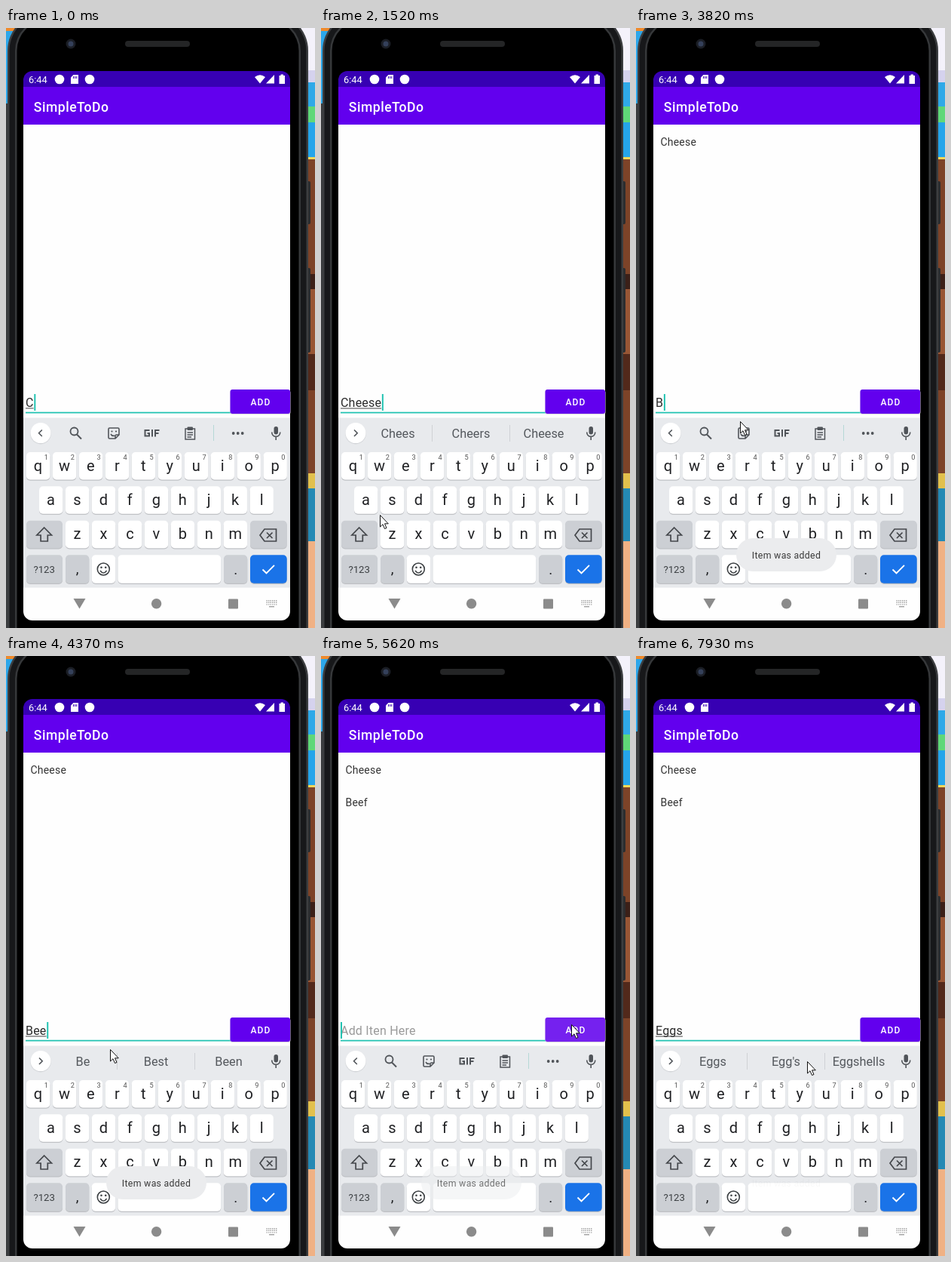
An HTML page with a canvas for the animation above (8 s loop, 410 by 795 pixels).

```html
<!DOCTYPE html>
<html lang="en">
<head>
<meta charset="utf-8">
<title>To-do list demo</title>
<style>
html, body { margin: 0; width: 100%; height: 100%; overflow: hidden; background: #000; }
canvas { display: block; width: 410px; height: 795px; }
</style>
</head>
<body>
<canvas id="stage" width="410" height="795"></canvas>
<script>
const ctx = document.getElementById('stage').getContext('2d');
const LOOP = 8000;
const ICON = '#505459', TEAL = '#22c3b2', PURPLE = '#6200ee';

// Each track is a list of [start time, value...]; values hold until the next entry.
const typed = [[0, 'C'], [410, 'Ch'], [680, 'Che'], [960, 'Chee'], [1100, 'Chees'], [1380, 'Cheese'],
  [2240, ''], [3820, 'B'], [4240, 'Be'], [4370, 'Bee'], [4510, 'Beef'],
  [5480, ''], [6600, 'E'], [7000, 'Eg'], [7180, 'Egg'], [7340, 'Eggs']];
const suggestions = [[0, ''], [130, 'C|Can|Could'], [680, 'Ch|Check|Change'], [820, 'Che|Check|Cheese'],
  [1240, 'Chees|Cheers|Cheese'], [1650, 'Cheese|*|Cheesecake'], [2500, ''],
  [4100, 'B|But|By'], [4370, 'Be|Best|Been'], [4510, 'Bee|Been|Beer'], [4780, 'Beef|Need|Beer'],
  [5620, ''], [6850, 'E|Enjoy|Even'], [7180, 'Eg|Egg|Eggs'], [7490, "Eggs|Egg's|Eggshells"]];
const pointer = [[0], [1520, 78, 645], [1650, 290, 470], [1800, 338, 492], [1930, 334, 497],
  [2500, 275, 505], [2640, 170, 520], [2770, 145, 523], [2900, 138, 521],
  [4510, 220, 512], [4650, 310, 494], [4780, 337, 488], [5070, 332, 488], [5750],
  [7780, 233, 560], [7930, 227, 537]];
const caret = [[0, 1], [2100, 0], [2240, 1], [2770, 0], [3290, 1], [3700, 0], [3820, 1],
  [5070, 0], [5480, 1], [5890, 0], [6320, 1], [7780, 0]];
const toast = [[0, 0], [2370, .32], [2500, .7], [2640, 1], [4510, .7], [4650, .25], [4780, 0],
  [5480, .32], [5620, .7], [5750, 1], [7490, .8], [7630, .4], [7780, .15], [7930, .03]];
const pressed = [[0, 0], [1930, 1], [2640, 0], [5200, 1], [5750, 0]];
const added = [[0, 0], [2240, 1], [5480, 2]];

const at = (track, t) => track.findLast(key => key[0] <= t).slice(1);

function rect(x, y, w, h, color, r = 0) {
  ctx.fillStyle = color;
  ctx.beginPath();
  ctx.roundRect(x, y, w, h, r);
  ctx.fill();
}

function disc(x, y, r, color) {
  ctx.fillStyle = color;
  ctx.beginPath();
  ctx.arc(x, y, r, 0, 7);
  ctx.fill();
}

function ring(x, y, r, color, width) {
  ctx.strokeStyle = color;
  ctx.lineWidth = width;
  ctx.beginPath();
  ctx.arc(x, y, r, 0, 7);
  ctx.stroke();
}

function text(str, x, y, size, color, { weight = 400, align = 'left', spacing = 0 } = {}) {
  ctx.font = `${weight} ${size}px Roboto, sans-serif`;
  ctx.letterSpacing = spacing + 'px';
  ctx.textAlign = align;
  ctx.fillStyle = color;
  ctx.fillText(str, x, y);
  return ctx.measureText(str).width;
}

function stroke(path, color, width = 1.6) {
  ctx.strokeStyle = color;
  ctx.lineWidth = width;
  ctx.stroke(new Path2D(path));
}

function fill(path, color) {
  ctx.fillStyle = color;
  ctx.fill(new Path2D(path));
}

function drawPhone() {
  const bands = [[0, '#f4f2fb'], [56, '#d5d2ee'], [72, '#2fa9e8'], [104, '#5fd878'], [125, '#25a5ea'],
    [171, '#f0d858'], [174, '#7d4328'], [326, '#3b2018'], [346, '#985635'], [432, '#52291b'],
    [480, '#7d4328'], [590, '#e2c04c'], [610, '#2489b4'], [680, '#f0b184']];
  bands.forEach(([y, color]) => rect(205, y, 205, 795 - y, color));
  rect(0, 0, 205, 100, '#2da7ea');
  rect(0, 0, 205, 4, '#ef8a2c');
  rect(0, 100, 205, 695, '#3b3d3f');
  rect(398, 203, 6, 57, '#2c2d2f', 2);
  rect(398, 318, 6, 112, '#2c2d2f', 2);
  rect(2, -20, 399, 880, '#3c3e40', 50);
  rect(4.5, -18, 394, 880, '#17181a', 48);
  rect(12, -12, 379, 880, '#36383a', 42);
  rect(14.5, -10, 374, 880, '#000', 40);
  disc(86, 21, 6.5, '#1b1e25');
  disc(86, 21, 3.5, '#34405a');
  rect(158, 17, 86, 8, '#242526', 4);
}

function drawStatusBar(t) {
  rect(23, 68, 354, 717, '#fefefe', [0, 0, 12, 12]);
  rect(23, 57, 354, 22, '#3700b3', [12, 12, 0, 0]);
  rect(23, 78, 354, 50, PURPLE);
  text('6:44', 30, 73, 12.8, '#fff');
  disc(71, 68, 6.3, '#fff');
  fill('M89.5 62H96V74H86V65.5Z', '#fff');
  stroke('M89.5 64V67M91.7 64V67M93.8 64V67', '#3700b3', 1);
  if (t < 7100) disc(111, 68, 6.3, '#fff');
  fill('M337 73.5L330 65Q337 59.5 344 65ZM356 62V73.5H345ZM362.5 63H364.5V61.5H368V63H370V74H362.5Z', '#fff');
  text('SimpleToDo', 36.8, 110.5, 17.6, '#fff', { weight: 500, spacing: .5 });
}

function drawContent(t) {
  const [count] = at(added, t);
  ['Cheese', 'Beef'].slice(0, count).forEach((item, i) =>
    text(item, 32.5, 156 + i * 43, 14, '#333', { spacing: .2 }));

  const [value] = at(typed, t);
  rect(26, 508.7, 272, 1.8, TEAL);
  const width = text(value || 'Add Iten Here', 26, 502.3, 16, value ? '#2b2b2b' : '#9a9a9a', { spacing: .2 });
  if (value && !(t >= 3820 && t < 4100)) rect(26, 503.4, width, 1, '#444');
  if (at(caret, t)[0]) rect(26 + (value ? width + .7 : 0), 485, 2, 22, TEAL);

  rect(297.5, 480, 80, 32, '#d6d2de', 3);
  rect(297.5, 479, 79.5, 32, at(pressed, t)[0] ? '#7521ef' : PURPLE, 3);
  text('ADD', 338, 499.8, 12, '#fff', { weight: 500, align: 'center', spacing: 1.1 });
}

function drawTools() {
  ring(90.5, 534.5, 5, ICON, 1.8);
  stroke('M94 538.5L100 544.5', ICON, 2);
  stroke('M137.5 530H148.5Q150 530 150 531.5V539L145 544H137.5Q136 544 136 542.5V531.5Q136 530 137.5 530ZM150 539H146.5Q145 539 145 540.5V544M139 538Q141 541.5 144 540', ICON);
  disc(140.5, 534.5, 1.1, ICON);
  disc(146, 534.5, 1.1, ICON);
  stroke('M190.5 533H184.5V540.5H190V537H187.5M194 532V541.5M198 541.5V533H203.5M198 537H202.5', ICON, 2);
  stroke('M238 531H250.5V545H238ZM240.5 536H248M240.5 539H248M240.5 542H246', ICON, 1.5);
  rect(240.5, 528.5, 7.5, 4.5, ICON, 1);
  rect(275, 526, 1, 21, '#b5d8d6');
  [302, 308, 314].forEach(x => disc(x - .3, 537, 1.9, ICON));
}

function drawSuggestions(words) {
  rect(147, 526, 1, 22, '#cfd1d5');
  rect(250, 526, 1, 22, '#cfd1d5');
  words.split('|').forEach((word, i) => {
    const x = [102, 199, 295.5][i];
    if (word === '*') {
      fill('M190 538.5L203 529.5L208 534L207.5 541.5L191 546Z', '#f3b52f');
      fill('M190 538.5L203 529.5L208 534Z', '#ffe17a');
      disc(195.5, 541.5, 1.7, '#d58c1c');
      disc(203, 539.5, 1.5, '#d58c1c');
    } else {
      text(word, x, 542.7, word.length > 9 ? 14.5 : 16.3, '#54585d', { align: 'center' });
    }
  });
}

function key(x, y, w, color = '#fff', h = 36.5) {
  rect(x, y + 1.2, w, h, '#bfc1c5', 5);
  rect(x, y, w, h, color, 5);
}

function drawKeyboard(t) {
  const gray = '#cccfd4', ink = '#202124';
  rect(23, 517, 354, 224.5, '#e8eaed');
  rect(23, 516, 354, 1, '#f4f4f5');

  const [words] = at(suggestions, t);
  disc(46, 537.6, 13.8, '#d3d5d9');
  disc(46, 536.6, 13.5, '#fff');
  stroke(words ? 'M44 532.5L48.2 536.8L44 541' : 'M47.8 532.5L43.6 536.8L47.8 541', ICON);
  words ? drawSuggestions(words) : drawTools();

  rect(355.5, 528, 5.5, 10.5, ICON, 3);
  stroke('M352.7 535.5Q353 541.3 358.2 541.3Q363.5 541.3 363.8 535.5M358.2 541V546', ICON);

  const rows = [['qwertyuiop', 27, 562, 586.5], ['asdfghjkl', 44, 607.3, 631.7], ['zxcvbnm', 79, 652.8, 677.3]];
  rows.forEach(([letters, left, top, base], row) => [...letters].forEach((letter, i) => {
    const x = left + i * 34.95;
    key(x, top, 31.3);
    text(letter, x + 15.5, base, 20, ink, { align: 'center' });
    if (!row) text((i + 1) % 10, x + 26.3, 572.3, 9.2, '#555', { align: 'center' });
  }));

  key(27, 652.8, 48, gray);
  stroke('M50.7 662L60.5 672H55.3V680H46.1V672H40.9Z', '#44474b', 1.7);
  key(324, 652.8, 48.7, gray);
  stroke('M343 664H358.5V680H343L337 672ZM346 668.5L353.5 676M353.5 668.5L346 676', '#44474b', 1.7);

  const bottom = (x, w, color) => key(x, 698.3, w, color, 37.5);
  bottom(27, 48, gray);
  text('?123', 50.7, 722, 13.2, '#3c4043', { align: 'center' });
  bottom(79, 31.3, gray);
  text(',', 94.7, 723, 19, ink, { align: 'center' });
  bottom(113.8, 31.3);
  ring(129.3, 717, 8, '#3c4043', 1.6);
  disc(126.5, 714.7, 1.3, '#3c4043');
  disc(132.2, 714.7, 1.3, '#3c4043');
  stroke('M125 719Q129.3 725 133.6 719', '#3c4043', 1.5);
  bottom(148.5, 136.7);
  bottom(289, 31.3, gray);
  text('.', 304.7, 724, 19, ink, { align: 'center' });
  bottom(324, 48.7, '#1a73e8');
  stroke('M340.5 717.5L345.5 722.3L356 711.8', '#fff', 1.9);
}

function drawNavigation() {
  const gray = '#8b8b8b';
  fill('M89.5 756H105.5L97.5 769.5Z', gray);
  disc(199.6, 762.8, 6.7, gray);
  rect(295, 756.5, 13, 13, gray, 1);
  for (let row = 0; row < 3; row++)
    for (let i = 0; i < 6; i++) rect(345.5 + i * 2.5, 758 + row * 2.6, 1.4, 1.4, '#a0a0a0');
  rect(349, 766, 7, 1.4, '#a0a0a0');
}

function drawToast(t) {
  const [alpha] = at(toast, t);
  if (!alpha) return;
  ctx.globalAlpha = alpha ** 2;
  rect(133, 676, 133, 44, '#ebecee', 22);
  ctx.globalAlpha = alpha;
  text('Item was added', 199.5, 703, 12.3, '#3a3a3a', { align: 'center', spacing: .3 });
  ctx.globalAlpha = 1;
}

function drawPointer(t) {
  const [x, y] = at(pointer, t);
  if (x === undefined) return;
  ctx.save();
  ctx.translate(x + .5, y + .5);
  const arrow = 'M0 0V15.5L3.5 12.2L6 18L8.5 17L6 11.3H10.8Z';
  fill(arrow, '#fff');
  stroke(arrow, '#111', 1);
  ctx.restore();
}

function frame(now) {
  const t = now % LOOP;
  drawPhone();
  drawStatusBar(t);
  drawContent(t);
  drawKeyboard(t);
  drawNavigation();
  drawToast(t);
  drawPointer(t);
  requestAnimationFrame(frame);
}
requestAnimationFrame(frame);
</script>
</body>
</html>
```
